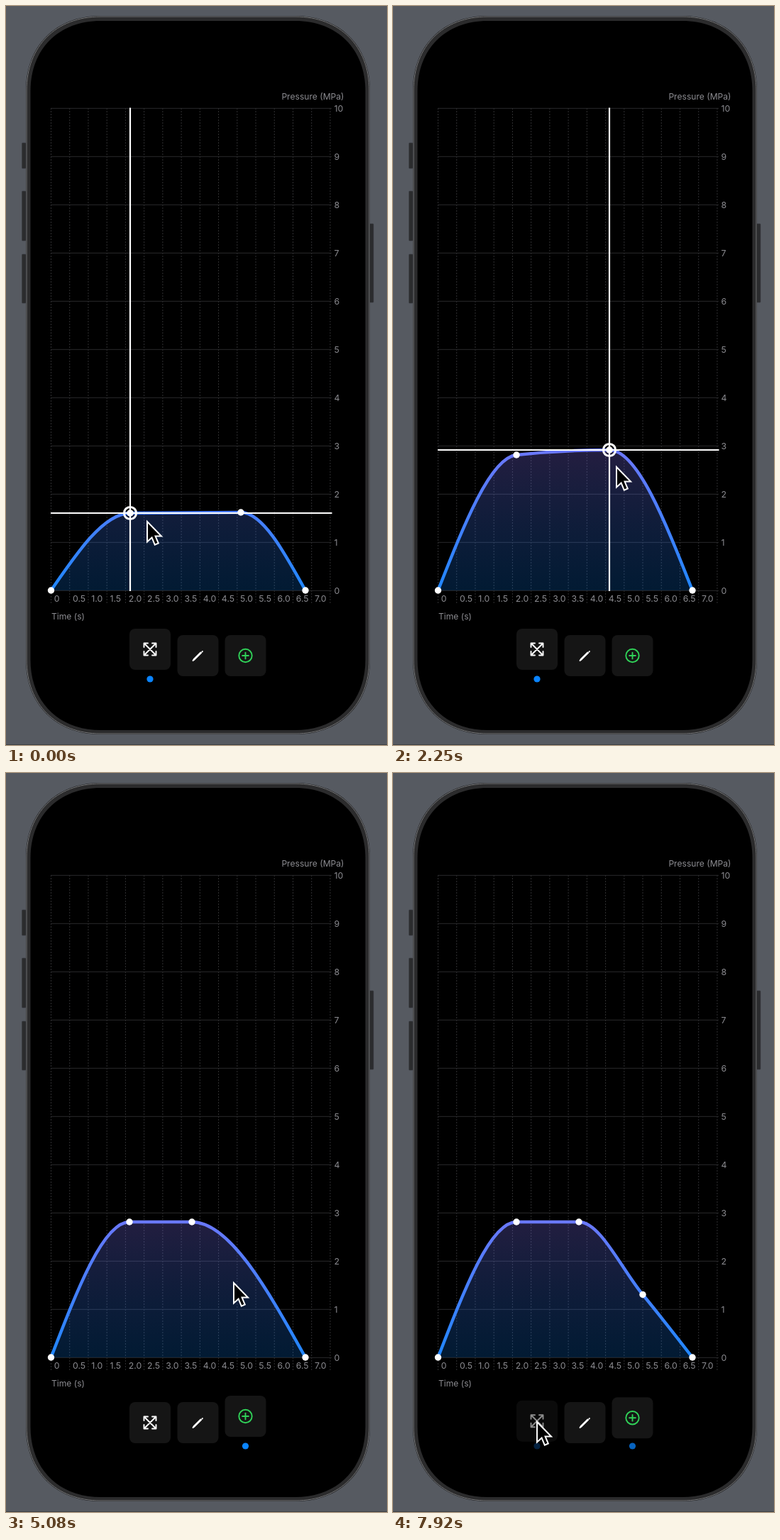
Animation of 537 by 1042 pixels, one loop 8000 ms. Source, as an HTML page:

```html
<!DOCTYPE html>
<html lang="en">
<head>
<meta charset="utf-8">
<title>Pressure curve editor</title>
<style>
  html, body { margin: 0; width: 100%; height: 100%; overflow: hidden; background: #565a61; }
  svg { display: block; position: absolute; left: 0; top: 0; }
  text { font: 12.3px Inter, Roboto, sans-serif; fill: #8b8b90; }
  .title { font-size: 12.1px; }
  .grid { stroke: #2a2a2c; fill: none; }
  .dash { stroke: #303032; stroke-dasharray: 2 2; }
  .icon { fill: none; stroke: #fff; stroke-width: 1.9; stroke-linecap: round; stroke-linejoin: round; }
</style>
</head>
<body>
<svg id="stage" width="537" height="1042" viewBox="0 0 537 1042">
  <defs>
    <linearGradient id="line" gradientUnits="userSpaceOnUse" x1="0" y1="824" x2="0" y2="633">
      <stop offset="0" stop-color="#2087ff"/><stop offset="1" stop-color="#6978fb"/>
    </linearGradient>
    <linearGradient id="area" gradientUnits="userSpaceOnUse" x1="0" y1="824" x2="0" y2="633">
      <stop offset="0" stop-color="#0a84ff" stop-opacity=".2"/>
      <stop offset="1" stop-color="#7a6ae4" stop-opacity=".28"/>
    </linearGradient>
  </defs>
  <g id="phone"></g>
  <g id="chart"></g>
  <path id="fill" fill="url(#area)"/>
  <path id="curve" fill="none" stroke="url(#line)" stroke-width="4.4" stroke-linejoin="round"/>
  <g id="dots" fill="#fff"></g>
  <g id="cross" stroke="#fff" stroke-width="2.2" fill="none">
    <path id="hair"/>
    <circle id="ring" r="8.6" stroke-width="3"/>
    <circle id="core" r="4.6" fill="#fff" stroke="none"/>
  </g>
  <g id="tools"></g>
  <path id="cursor" d="M0 0V28.5L6.6 22.4L10.8 32.6L15.8 30.5L11.6 20.6H20Z"
        fill="#000" stroke="#fff" stroke-width="2" stroke-linejoin="miter"/>
</svg>
<script>
const LOOP = 8000, STEP = 1000 / 12;
const LEFT = 63.5, BASE = 824, UNIT = 68, TICK = 26.23;
const $ = id => document.getElementById(id);

function add(parent, tag, attrs, text) {
  const el = document.createElementNS('http://www.w3.org/2000/svg', tag);
  for (const k in attrs) el.setAttribute(k, attrs[k]);
  if (text !== undefined) el.textContent = text;
  parent.appendChild(el);
  return el;
}
function set(el, attrs) {
  for (const k in attrs) el.setAttribute(k, attrs[k]);
}

// Rounded rectangle with softened, continuous corners
function squircle(x, y, w, h, r) {
  const c = r * 0.6, q = r - c;
  return `M${x + r} ${y}h${w - 2 * r}c${c} 0 ${r} ${q} ${r} ${r}v${h - 2 * r}` +
    `c0 ${c} ${-q} ${r} ${-r} ${r}h${2 * r - w}c${-c} 0 ${-r} ${-q} ${-r} ${-r}` +
    `v${2 * r - h}c0 ${-c} ${q} ${-r} ${r} ${-r}Z`;
}

function buildPhone() {
  const g = $('phone');
  add(g, 'rect', { width: 537, height: 1042, fill: '#565a61' });
  add(g, 'rect', { y: 1041, width: 537, height: 1, fill: '#3d4045' });
  for (const [x, y, h] of [[22.5, 193, 36], [22.5, 261, 70], [22.5, 350, 69], [512.5, 307, 111]])
    add(g, 'rect', { x, y, width: 5.5, height: h, rx: 1, fill: '#2b2c2e', stroke: '#3a3c40', 'stroke-width': .6 });
  add(g, 'path', { d: squircle(28, 14, 485, 1013, 105), fill: '#1a1a1b' });
  add(g, 'path', { d: squircle(29, 15, 483, 1011, 104), fill: '#2b2b2c', stroke: '#77787a', 'stroke-width': 1 });
  add(g, 'path', { d: squircle(34.5, 21, 472, 1000, 99), fill: '#000' });
}

function buildChart() {
  const g = $('chart');
  for (let i = 0; i <= 15; i++) {
    const x = LEFT + i * TICK;
    add(g, 'path', { class: 'grid dash', d: `M${x} 144V844` });
    if (i < 15) add(g, 'text', { x: x + 4.3, y: 840.3 }, i ? (i / 2).toFixed(1) : 0);
  }
  for (let v = 0; v <= 10; v++) {
    const y = BASE - v * UNIT;
    add(g, 'path', { class: 'grid', d: `M63 ${y + .3}H459` });
    add(g, 'text', { x: 462.5, y: y + 4.5 }, v);
  }
  add(g, 'text', { class: 'title', x: 476.5, y: 132, 'text-anchor': 'end' }, 'Pressure (MPa)');
  add(g, 'text', { class: 'title', x: 64, y: 864.6 }, 'Time (s)');
}

function button(x, icon, color) {
  const body = add($('tools'), 'g', {});
  add(body, 'rect', { x: -29, y: -29, width: 58, height: 58, rx: 8, fill: '#151515' });
  add(body, 'path', { class: 'icon', d: icon, style: `stroke:${color}` });
  const dot = add($('tools'), 'circle', { cx: x, cy: 949, r: 4.6, fill: '#0a84ff' });
  return (lift, glow, alpha) => {
    set(body, { transform: `translate(${x} ${916 - 9 * lift})`, opacity: alpha });
    dot.setAttribute('opacity', glow);
  };
}

buildPhone();
buildChart();
const moveBtn = button(203,
  'M-8 -8L8 8M-8 8L8 -8M-8.5 -3V-8.5H-3M3 -8.5H8.5V-3M8.5 3V8.5H3M-3 8.5H-8.5V3', '#fff');
const penBtn = button(270.5, 'M-7 7L-5 5.7L4.6 -3.9L3.9 -4.6L-5.7 5ZM6 -5.4L6.4 -6', '#fff');
const addBtn = button(337.5,
  'M-9.2 0A9.2 9.2 0 1 1 9.2 0A9.2 9.2 0 1 1 -9.2 0M-4.4 0H4.4M0 -4.4V4.4', '#30d158');
const dots = [0, 1, 2, 3, 4].map(() => add($('dots'), 'circle', { r: 4.7 }));

// Tangents of a monotone cubic through [x, y] pairs
function tangents(p) {
  const n = p.length - 1, h = [], s = [], m = [];
  for (let i = 0; i < n; i++) {
    h[i] = p[i + 1][0] - p[i][0];
    s[i] = (p[i + 1][1] - p[i][1]) / h[i];
  }
  for (let i = 1; i < n; i++) {
    const mean = (s[i - 1] * h[i] + s[i] * h[i - 1]) / (h[i - 1] + h[i]);
    m[i] = (Math.sign(s[i - 1]) + Math.sign(s[i])) *
      Math.min(Math.abs(s[i - 1]), Math.abs(s[i]), Math.abs(mean) / 2);
  }
  m[0] = (3 * s[0] - m[1]) / 2;
  m[n] = (3 * s[n - 1] - m[n - 1]) / 2;
  return m;
}

function curvePath(p) {
  const m = tangents(p);
  let d = `M${p[0]}`;
  for (let i = 0; i < p.length - 1; i++) {
    const [x0, y0] = p[i], [x1, y1] = p[i + 1], k = (x1 - x0) / 3;
    d += `C${x0 + k} ${y0 + k * m[i]} ${x1 - k} ${y1 - k * m[i + 1]} ${x1} ${y1}`;
  }
  return d;
}

// Smooth track over rows of [time, x, y]
function track(rows) {
  const axes = [1, 2].map(c => {
    const p = rows.map(r => [r[0], r[c]]), m = tangents(p);
    return t => {
      if (t <= p[0][0]) return p[0][1];
      let i = 0;
      while (i < p.length - 1 && t >= p[i + 1][0]) i++;
      if (i === p.length - 1) return p[i][1];
      const h = p[i + 1][0] - p[i][0], u = (t - p[i][0]) / h, v = 1 - u;
      return v * v * (1 + 2 * u) * p[i][1] + u * u * (3 - 2 * u) * p[i + 1][1] +
        h * u * v * (v * m[i] - u * m[i + 1]);
    };
  });
  return t => axes.map(f => f(t));
}

const first = track([[-100, 175, 715], [0, 175, 715], [720, 174, 633], [LOOP, 174, 633]]);
const second = track([
  [0, 331, 714], [1085, 331, 714], [1500, 322, 682], [1600, 322, 682], [2250, 305, 626],
  [2800, 285, 630], [3260, 271, 633], [3670, 262, 633], [LOOP, 262, 633]
]);
const pointer = track([
  [-100, 199, 727], [0, 199, 727], [720, 198, 645], [760, 198, 645], [1040, 335, 730],
  [1085, 335, 730], [1500, 332, 706], [1600, 332, 706], [2250, 315, 650], [2800, 295, 654],
  [3260, 281, 657], [3670, 272, 657], [3770, 272, 657], [4500, 352, 900], [4590, 352, 900],
  [5083, 321, 719], [5417, 349, 724], [5500, 353, 732], [6340, 353, 732], [6833, 271, 900],
  [6920, 271, 900], [7083, 271, 907], [7750, 203, 915], [LOOP, 203, 915]
]);

function ease(t, start, span) {
  const u = Math.min(1, Math.max(0, (t - start) / span));
  return u * u * (3 - 2 * u);
}

function draw(t) {
  const a = first(t), b = second(t), grow = ease(t, 5590, 330);
  const pts = [[LEFT, BASE], a, b];
  if (grow > 0) pts.push([352, 707 + 28.5 * grow]);
  pts.push([422, BASE]);

  const d = curvePath(pts);
  $('curve').setAttribute('d', d);
  $('fill').setAttribute('d', d + `L${LEFT} ${BASE}Z`);
  dots.forEach((el, i) => {
    const p = pts[i];
    if (p) set(el, { cx: p[0], cy: p[1], opacity: i === 3 && grow > 0 ? grow : 1 });
    else el.setAttribute('opacity', 0);
  });

  const sel = t < 1000 ? a : t < 4590 ? b : null;
  $('cross').setAttribute('visibility', sel ? 'visible' : 'hidden');
  if (sel) {
    const [cx, cy] = sel;
    $('hair').setAttribute('d', `M${cx} 143.5V825M63 ${cy}H459.5`);
    set($('ring'), { cx, cy });
    set($('core'), { cx, cy });
  }

  // Active tool: move, then add, then move again
  const toAdd = ease(t, 4585, 250), toMove = ease(t, 7835, 250);
  const adding = toAdd - toMove;
  const press = (start, e) => t > start ? .4 + .6 * e : 1;
  moveBtn(1 - adding, 1 - adding, press(7840, toMove));
  penBtn(0, 0, 1);
  addBtn(adding, adding, press(4590, toAdd));

  $('cursor').setAttribute('transform', `translate(${pointer(t)})`);
}

const start = performance.now();
function tick() {
  const t = (performance.now() - start) % LOOP;
  draw(Math.floor((t + 5) / STEP) % 96 * STEP);
  requestAnimationFrame(tick);
}
tick();
</script>
</body>
</html>
```
